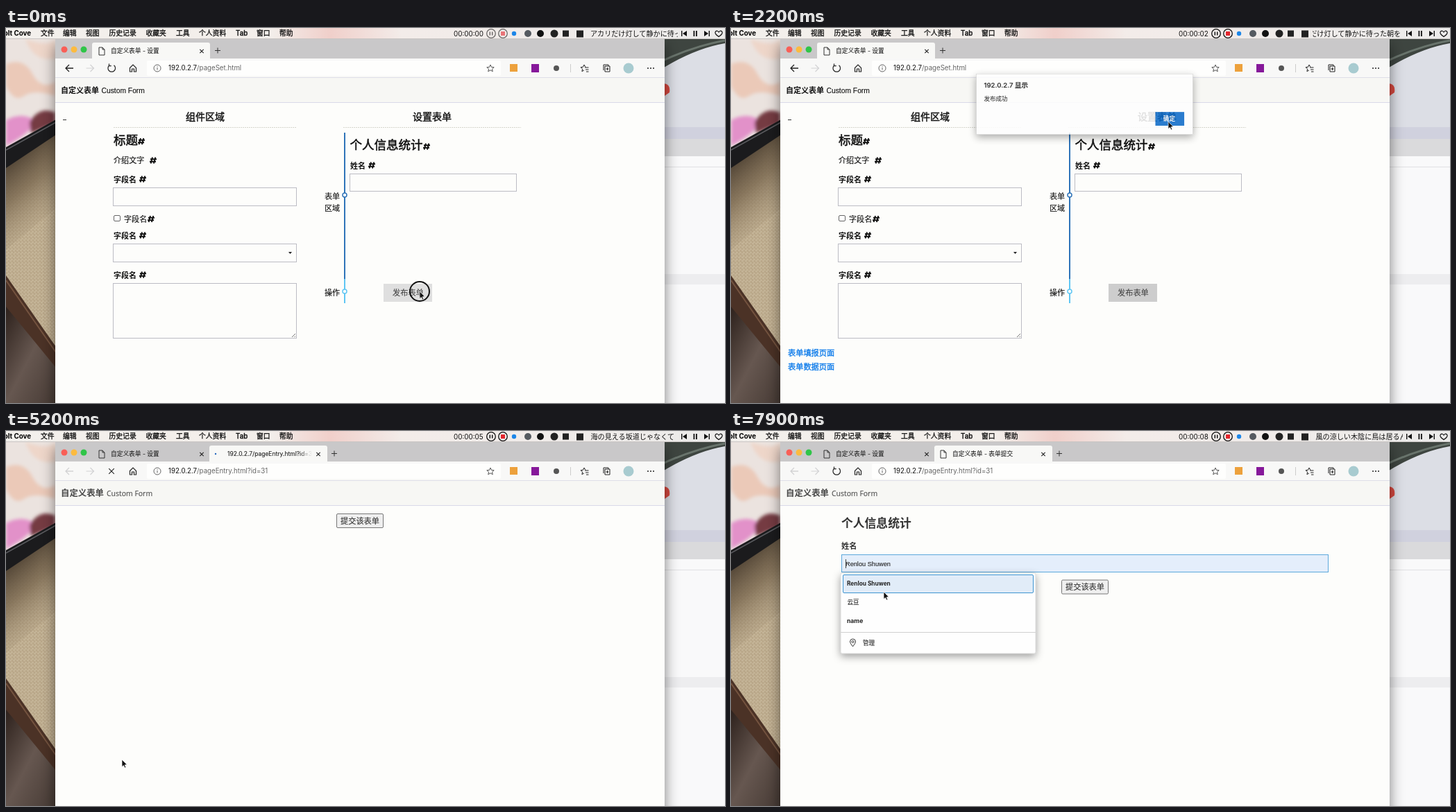
These frames come from a looping animation (1036x541 px, 8000 ms). An HTML page:

```html
<!DOCTYPE html>
<html lang="zh">
<head>
<meta charset="utf-8">
<title>Custom Form</title>
<style>
html, body { margin: 0; width: 100%; height: 100%; overflow: hidden; background: #fdfdfb; }
svg { display: block; width: 1036px; height: 541px; }
text { font-family: Inter, "Noto Sans CJK SC", sans-serif; white-space: pre; }
.ja { font-family: "Noto Sans CJK JP", sans-serif; }
.arial { font-family: "Liberation Sans", "Noto Sans CJK SC", sans-serif; }
.open { font-family: "Noto Sans", "Noto Sans CJK SC", sans-serif; }
</style>
</head>
<body>
<svg id="stage" viewBox="0 0 1036 541"></svg>
<script>
const DURATION = 8000, STEP = 100;
const HOST = '192.0.2.7', PERSON = 'Renlou Shuwen';

// Drawing helpers; a thin outline gives regular glyphs their medium weight
const text = (x, y, s, size, fill = '#111', weight = 400, cls = '') =>
  `<text x="${x}" y="${y}" font-size="${size}" fill="${fill}" font-weight="${weight}" class="${cls}"
    stroke="${fill}" stroke-width="${weight === 700 ? 0 : size * (weight === 500 ? .03 : .012)}">${s}</text>`;
const rect = (x, y, w, h, fill, more = '') =>
  `<rect x="${x}" y="${y}" width="${w}" height="${h}" fill="${fill}" ${more}/>`;
const box = (x, y, w, h, stroke, fill = 'none', more = '') =>
  rect(x + .5, y + .5, w - 1, h - 1, fill, `stroke="${stroke}" ${more}`);
const dot = (x, y, r, fill, more = '') => `<circle cx="${x}" cy="${y}" r="${r}" fill="${fill}" ${more}/>`;
const line = (d, stroke = '#222', w = 1, more = '') =>
  `<path d="${d}" fill="none" stroke="${stroke}" stroke-width="${w}" ${more}/>`;
const shape = (d, fill, more = '') => `<path d="${d}" fill="${fill}" ${more}/>`;
const group = (id, ...parts) => `<g id="${id}">${parts.join('')}</g>`;
const hash = (x, y) => line(`M${x + 4} ${y - 9}l-2.4 9M${x + 8.3} ${y - 9}l-2.4 9M${x + 1} ${y - 6.2}h9M${x} ${y - 2.7}h9`, '#111', 1.9);
const label = (x, y, s, size = 11, weight = 700) =>
  text(x, y, s, size, '#111', weight) + hash(x + s.length * size + 4, y);
const fileIcon = x => line(`M${x - 4} 28h5l3 3v8h-8zM${x + 1} 28v3h3`, '#333');
const cross = (x, y, r) => line(`M${x - r} ${y - r}l${2 * r} ${2 * r}m0 ${-2 * r}l${-2 * r} ${2 * r}`, '#222', 1.1);

const defs = `<defs>
  <linearGradient id="bar"><stop offset="0" stop-color="#f3f0ec"/><stop offset=".37" stop-color="#f3eeea"/>
    <stop offset=".45" stop-color="#f0cfca"/><stop offset=".55" stop-color="#f3ece9"/><stop offset="1" stop-color="#ecebea"/></linearGradient>
  <linearGradient id="shade" x2=".35" y2="1"><stop offset=".2" stop-color="#463a2d"/><stop offset=".55" stop-color="#7a6850" stop-opacity=".8"/><stop offset="1" stop-color="#a39175" stop-opacity="0"/></linearGradient>
  <linearGradient id="leather" x2="1" y2="1"><stop offset="0" stop-color="#2d211c"/><stop offset=".5" stop-color="#665750"/><stop offset="1" stop-color="#463a34"/></linearGradient>
  <linearGradient id="fade"><stop offset="0" stop-color="#f8f8f6" stop-opacity="0"/><stop offset="1" stop-color="#f8f8f6"/></linearGradient>
  <pattern id="weave" width="5" height="5" patternUnits="userSpaceOnUse">
    <rect width="5" height="5" fill="#bfae90"/><path d="M0 1h3M2 4h3" stroke="#cabb9f"/><path d="M4 0v3M1 2v3" stroke="#b3a183"/></pattern>
  <filter id="soft"><feGaussianBlur stdDeviation="2.5"/></filter>
  <filter id="glow" x="-20%" y="-20%" width="140%" height="150%"><feDropShadow dx="0" dy="4" stdDeviation="6" flood-opacity=".38"/></filter>
  <filter id="windowGlow" x="-20%" y="-20%" width="140%" height="150%"><feDropShadow dx="0" dy="8" stdDeviation="10" flood-opacity=".5"/></filter>
  <clipPath id="lyricClip"><rect x="838" width="130" height="16"/></clipPath>
  <clipPath id="tabClip"><rect x="315" y="20" width="126" height="24"/></clipPath>
  <clipPath id="desk"><rect y="15" width="1036" height="526"/></clipPath>
</defs>`;

const desktop = `<g clip-path="url(#desk)">` + [
  rect(0, 15, 72, 526, 'url(#weave)'),
  shape('M0 15H72V150L0 195Z', '#ebe3df'),
  '<g filter="url(#soft)">',
  shape('M28 16Q62 28 71 16V44Q40 50 28 16Z', '#eed6c9'),
  shape('M0 52Q25 42 38 66T71 78V98Q40 88 26 98T0 84Z', '#ecc3b0', 'opacity=".8"'),
  shape('M0 133Q24 120 42 134Q38 150 0 170Z', '#e291c9'),
  shape('M34 136Q48 112 71 122V138L36 152Z', '#743a42'),
  '</g>',
  shape('M0 194L72 148V260L0 320Z', 'url(#shade)'),
  shape('M0 172L72 132V154L0 202Z', '#1b1b1d'),
  line('M0 176L72 136', '#5b5c60', 1.5),
  shape('M0 357L72 460V494L0 404Z', '#4b3226'),
  line('M0 364L72 468', '#74533f', 2),
  shape('M0 402L72 490V541H0Z', 'url(#leather)'),
  rect(940, 15, 96, 130, '#dcdee5'),
  shape('M940 15H1036V22Q990 30 940 62Z', '#3e4540'),
  line('M940 50Q990 26 1036 18', '#69746c', 3),
  shape('M946 80Q958 80 956 93L946 100Z', '#d8483f'),
  rect(940, 143, 96, 17, '#d0d1de'), rect(940, 160, 96, 25, '#dadadc'),
  rect(940, 185, 96, 356, '#f9f9fa'), rect(940, 200, 96, 1, '#e1e1e3'),
  rect(940, 355, 96, 15, '#ededef')
].join('') + rect(71, 16, 878, 540, '#888', 'filter="url(#windowGlow)"') + '</g>';

const menus = [[50, '文件'], [82, '编辑'], [115, '视图'], [148.5, '历史记录'], [201.5, '收藏夹'], [245, '工具'],
  [278, '个人资料'], [331, 'Tab'], [361, '窗口'], [394, '帮助']];

const menuBar = rect(0, 0, 1036, 15, 'url(#bar)') + rect(0, 15, 1036, 1, '#c9c5c3') +
  `<text x="36" y="11" text-anchor="end" font-size="9.8" font-weight="700">Fernholt Cove</text>` +
  menus.map(([x, s]) => text(x, 11, s, 9.8, '#111', 500)).join('') +
  `<text id="clock" x="645" y="11.5" font-size="9.9" fill="#111" font-variant-numeric="tabular-nums"></text>` +
  group('record',
    dot(699, 8, 6.3, 'none', 'stroke="#111" stroke-width="1.3"'), line('M697.3 5.5v5M700.7 5.5v5', '#111', 1.5),
    dot(716, 8, 6.3, 'none', 'stroke="#111" stroke-width="1.3"'), rect(713, 5, 6, 6, '#e3262d')) +
  dot(732, 8, 3.2, '#1c86e8') + dot(752, 8, 5, '#555a60') + dot(770, 8, 5, '#111') + dot(790, 8, 5.5, '#222') +
  rect(802, 3.5, 9, 9, '#222') + rect(822, 3.5, 10, 10, '#222') +
  `<g clip-path="url(#lyricClip)"><text id="lyric" class="ja" y="11.5" font-size="10.1" fill="#111"></text></g>` +
  shape('M973 4v8h1.4V4zM981 4v8l-6-4zM990.5 4h1.8v8h-1.8zM994 4h1.8v8H994zM1006 4v8l6-4zM1012.6 4v8h1.4V4z', '#111') +
  line('M1027 12.5q-7-4.5-4.5-7.5q2.5-2 4.5 1q2-3 4.5-1q2.5 3-4.5 7.5z', '#111', 1.2);

const chrome = rect(71, 16, 878, 28, '#c9c8c9') +
  dot(84, 31, 4.5, '#f95f57') + dot(98, 31, 4.5, '#fcbb3f') + dot(112, 31, 4.5, '#30c548') +
  group('activeTab', shape('M124 44V24q0-3 3-3h164q3 0 3 3v20z', '#f8f8f6')) +
  fileIcon(138) + text(151, 36.3, '自定义表单 - 设置', 8.7, '#222') + cross(282, 33.5, 2.7) +
  group('tabLoading', dot(302, 33, 1.2, '#2367bd'),
    `<g clip-path="url(#tabClip)">${text(319, 36.3, HOST + '/pageEntry.html?id=31', 8.5, '#222')}</g>`,
    rect(422, 24, 19, 18, 'url(#fade)')) +
  group('tabReady', fileIcon(306), text(319, 36.3, '自定义表单 - 表单提交', 8.7, '#222')) +
  group('tabClose', cross(450, 33.5, 2.7)) +
  group('plus', line('M301 32.5h8M305 28.5v8', '#333')) +
  rect(71, 44, 878, 28, '#f8f8f7') + rect(203, 47, 510, 22, '#fefefd', 'rx="2"') + rect(71, 71, 878, 1, '#dedee8') +
  group('back', line('M97 58h-11m5-5l-5 5l5 5', 'currentColor', 1.3)) +
  line('M115.5 58h11m-5-5l5 5l-5 5', '#d2d2d4', 1.2) +
  group('reload', line('M149 53.7a5.3 5.3 0 1 0 6.5 0M148.5 51.5v3.2h3.2', '#222', 1.2)) +
  group('stop', cross(152, 58, 3.8)) +
  line('M178.5 57.5l4.5-4.5l4.5 4.5v5.5h-3v-4h-3v4h-3z', '#222', 1.2) +
  dot(218, 58, 5, 'none', 'stroke="#666"') + line('M218 57v3.5M218 55v1', '#666') +
  `<text x="234" y="61.4" font-size="9.7" fill="#666"><tspan fill="#111">${HOST}</tspan><tspan id="path"></tspan></text>` +
  line('M698 53l1.5 3.4l3.7.3l-2.8 2.4l.9 3.6l-3.3-1.9l-3.3 1.9l.9-3.6l-2.8-2.4l3.7-.3z', '#555') +
  rect(726, 52, 11, 11, '#eda13c') + rect(757, 52, 11, 12, '#86189a') + dot(793, 58, 4, '#555') + rect(813, 52, 1, 12, '#ccc') +
  line('M835 56.5l-2-3.5l-1.5 3.3l-3.5.4l2.7 2.4l-.8 3.5l3-1.7M834 57h5.5M835 60h4.5M836 63h3.5', '#222') +
  line('M861 61v-8h7v2M863 55h7v8h-7zM866.5 57v4M864.5 59h4', '#222') +
  dot(897, 58, 7.5, '#a8cbd0') + dot(925, 58, 1, '#222') + dot(929, 58, 1, '#222') + dot(933, 58, 1, '#222');

const pageBase = rect(71, 72, 878, 469, '#fdfdfb');
const header = rect(71, 72, 878, 35, '#f7f7f4') + rect(71, 107, 878, 1, '#d9d9e8');
const border = '#bcbcc4';

const editor = group('editor', header,
  text(79, 94, '自定义表单', 11, '#111', 700), text(137.5, 94, 'Custom Form', 10.3, '#111', 400, 'arial'),
  rect(82, 132, 5, 1, '#333'),
  text(259, 133.3, '组件区域', 14, '#111', 500), text(586, 133.3, '设置表单', 14, '#111', 500),
  line('M155 143.5H419M486 143.5H742', '#d5d5cc', 1, 'stroke-dasharray="2 1"'),
  text(155, 168, '标题', 17.5, '#111', 500), hash(190, 168),
  text(155, 195, '介绍文字', 11.1), hash(207, 195.5),
  label(155, 222.5, '字段名'), box(154, 230, 265, 27, border),
  box(155, 270, 10, 9, '#666', '#fff', 'rx="1.5"'), text(170, 279.5, '字段名', 11.1), hash(204, 280),
  label(155, 303.5, '字段名'), box(154, 311, 265, 27, border), shape('M407 323h5l-2.5 3z', '#222'),
  label(155, 360.5, '字段名'), box(154, 368, 265, 80, border), line('M412 446l5-5M415.5 446l1.5-1.5', '#777'),
  rect(487, 151, 2, 211, '#2f74b9'), rect(487, 362, 2, 35, '#5fc6f3'),
  dot(488, 241, 3, '#fff', 'stroke="#2f74b9" stroke-width="1.5"'), dot(488, 380, 3, '#fff', 'stroke="#5fc6f3" stroke-width="1.5"'),
  text(459, 246.5, '表单', 11.1), text(459, 263.5, '区域', 11.1), text(459, 385.5, '操作', 11.1),
  text(495.5, 174.8, '个人信息统计', 17.5, '#111', 500), hash(601, 175.5),
  label(496, 202.5, '姓名'), box(495, 210, 241, 26, border),
  `<rect id="publish" x="544" y="369" width="70" height="26"/>`,
  group('publishFocus', box(544, 368.5, 70, 27, '#d5d5e0', 'none', 'rx="3"'),
    rect(546, 370.5, 66, 23, 'none', 'rx="2" stroke="#1c1c24" stroke-width="1.8"')),
  text(557, 386.2, '发布表单', 11.2, '#444'),
  group('links', `<g id="linkColor">${text(82, 472.8, '表单填报页面', 11.2, 'currentColor', 500)}</g>`,
    text(82, 493.3, '表单数据页面', 11.2, '#0d7bea', 500)),
  group('underline', rect(82, 474, 67, 1, '#0a58ad')));

const dialog = group('dialog',
  rect(352, 69, 315, 88, '#fefefe', 'filter="url(#glow)" stroke="#c8c8c8" stroke-width=".6"'),
  text(363, 88.7, HOST + ' 显示', 9.6, '#222', 600), text(363, 108, '发布成功', 8.6, '#222'),
  rect(612.5, 124.5, 42, 20, '#0b6ac8'), group('dialogFocus', box(611, 123, 45, 23, '#222'), rect(612.5, 124.5, 42, 20, 'none', 'stroke="#fff"')),
  text(624, 137.4, '确定', 8.7, '#fff', 700));

const form = group('form', group('formHeader', header,
    text(79, 94, '自定义表单', 12.4, '#484848', 700), text(145, 94, 'Custom Form', 10.4, '#555', 400, 'open'),
    group('submit', box(476, 119, 68, 21, '#777', '#efefef', 'rx="1.5"'), text(482, 133.8, '提交该表单', 11.2, '#333'))),
  group('fields', text(159, 138.9, '个人信息统计', 16.8, '#333', 700), text(159, 170.4, '姓名', 11.2, '#333', 700),
    `<rect id="input" x="159.5" y="178.5" width="701" height="25"/>`),
  group('popup', rect(158, 205, 281, 116, '#fefefe', 'rx="2" filter="url(#glow)" stroke="#bbb" stroke-width=".5"'),
    group('highlight', box(161, 207, 275, 27, '#3e94d1', '#e1ecf8', 'rx="1.5"'), text(165, 195, PERSON, 9.2, '#222', 400, 'arial')),
    text(167, 223.2, PERSON, 8.3, '#222', 700), text(167.5, 250, '云豆', 8.6, '#222'), text(167, 276.5, 'name', 8.6, '#222', 700),
    rect(158, 290, 281, 1, '#d0d0d0'),
    line('M175.5 311q-4-5-4-7a4 4 0 0 1 8 0q0 2-4 7z', '#333'), dot(175.5, 304, 1.5, 'none', 'stroke="#333"'),
    text(190, 308.6, '管理', 8.6, '#222')),
  group('caret', rect(165, 185, 1, 13, '#444')));

const pointer = group('pointer',
  group('ring', dot(0, 0, 14, 'none', 'stroke="#111" stroke-width="2"')),
  group('arrow', shape('M0 0V10.5L2.4 8.4L4.2 12L5.8 11.2L4.2 7.8L7.4 7.5Z', '#111', 'stroke="#fff" stroke-width=".7"')),
  group('hand', shape('M-1 0q1-1 2 0v4l5 1.5q1 .5.5 2l-1 4.5h-5l-4-5q0-1.5 2.5.5z', '#fff', 'stroke="#222" stroke-width=".9"')));

const stage = document.getElementById('stage');
stage.innerHTML = defs + desktop + menuBar + chrome + pageBase + editor + form + dialog + pointer;

// Motion tables: time followed by values
const pointerTrack = [[0, 596, 380], [200, 596, 380], [600, 634, 345], [1000, 660, 316], [1400, 660, 316],
  [1700, 642, 190], [1900, 630, 135], [2400, 630, 135], [3000, 340, 350], [3500, 137, 465], [4700, 137, 465],
  [5000, 167, 474], [5500, 167, 474], [6100, 254, 191.5], [6800, 254, 191.5], [7300, 220, 232], [8000, 220, 232]];
const dialogTrack = [[0, 0], [200, 0], [500, 1], [2100, 1], [2200, .87], [2300, .4], [2400, 0], [8000, 0]];
const lyricTrack = [[0, 842], [1200, 808], [1500, 804], [8000, 804]];
const recordTrack = [[0, .6], [1200, .7], [1900, 1], [8000, 1]];
const lyrics = [[0, 'アカリだけ灯して静かに待った朝を'], [3000, '港まで歩いて見てきたんだ'],
  [4700, '海の見える坂道じゃなくて'], [7300, '風の涼しい木陰に鳥は居るんだろう']];
const clicks = [[0, 200], [1900, 2100], [4400, 4600], [6200, 6400]];

const sample = (track, t) => {
  const i = Math.max(1, track.findIndex(k => k[0] >= t));
  const [a, b] = [track[i - 1], track[i]], p = (t - a[0]) / (b[0] - a[0]);
  return a.slice(1).map((v, j) => v + (b[j + 1] - v) * p);
};
const el = {};
stage.querySelectorAll('[id]').forEach(node => el[node.id] = node);
const set = (id, attrs) => Object.entries(attrs).forEach(([k, v]) => el[id].setAttribute(k, v));
const show = (id, on) => set(id, { visibility: on ? 'inherit' : 'hidden' });

function render(t) {
  const secondTab = t >= 4700, loaded = t >= 5600, focused = t >= 6400, picked = t >= 7200;
  const hover = t >= 3500 && !secondTab;
  el.clock.textContent = '00:00:0' + Math.floor((t + 450) / 1000);
  el.lyric.textContent = lyrics.filter(l => l[0] <= t).pop()[1];
  set('lyric', { x: t < 3000 ? sample(lyricTrack, t)[0] : 842.5 });
  set('record', { opacity: sample(recordTrack, t)[0] });

  set('activeTab', { transform: `translate(${secondTab ? 169 : 0})` });
  set('plus', { transform: `translate(${secondTab ? 168 : 0})` });
  show('tabLoading', secondTab && !loaded);
  show('tabReady', loaded);
  show('tabClose', secondTab);
  show('stop', secondTab && !loaded);
  show('reload', !secondTab || loaded);
  set('back', { color: secondTab ? '#d2d2d4' : '#222' });
  el.path.textContent = secondTab ? '/pageEntry.html?id=31' : '/pageSet.html';

  show('editor', !secondTab);
  const buttonFocus = (t >= 200 && t < 2100) || t >= 2500;
  set('publish', { fill: t < 200 ? '#dfdfdf' : '#cdcdcd' });
  show('publishFocus', buttonFocus && !secondTab);
  show('links', t >= 2100 && !secondTab);
  show('underline', hover);
  set('linkColor', { color: hover ? '#0a58ad' : '#0d7bea' });

  const [alpha] = sample(dialogTrack, t), closing = t >= 2200;
  set('dialog', { opacity: alpha, transform: closing ? 'translate(5.1 -2.1) scale(.99)' : '' });
  show('dialog', alpha > 0);
  show('dialogFocus', alpha > 0 && !closing);

  show('form', secondTab);
  show('formHeader', secondTab && t >= 5000);
  set('submit', { transform: `translate(0 ${loaded ? 95.5 : 0})` });
  show('fields', loaded);
  set('input', { fill: picked ? '#e4eefb' : '#fefefe', stroke: focused ? '#5ba8dc' : '#bcbcc4' });
  show('popup', focused);
  show('highlight', picked);
  show('caret', focused);

  set('pointer', { transform: `translate(${sample(pointerTrack, t).join(' ')})` });
  show('ring', clicks.some(([a, b]) => t >= a && t < b));
  show('hand', hover);
  show('arrow', !hover);
}

const start = performance.now();
function tick() {
  const t = (performance.now() - start) % DURATION;
  render(Math.floor(t / STEP) * STEP);
  requestAnimationFrame(tick);
}
tick();
</script>
</body>
</html>
```
